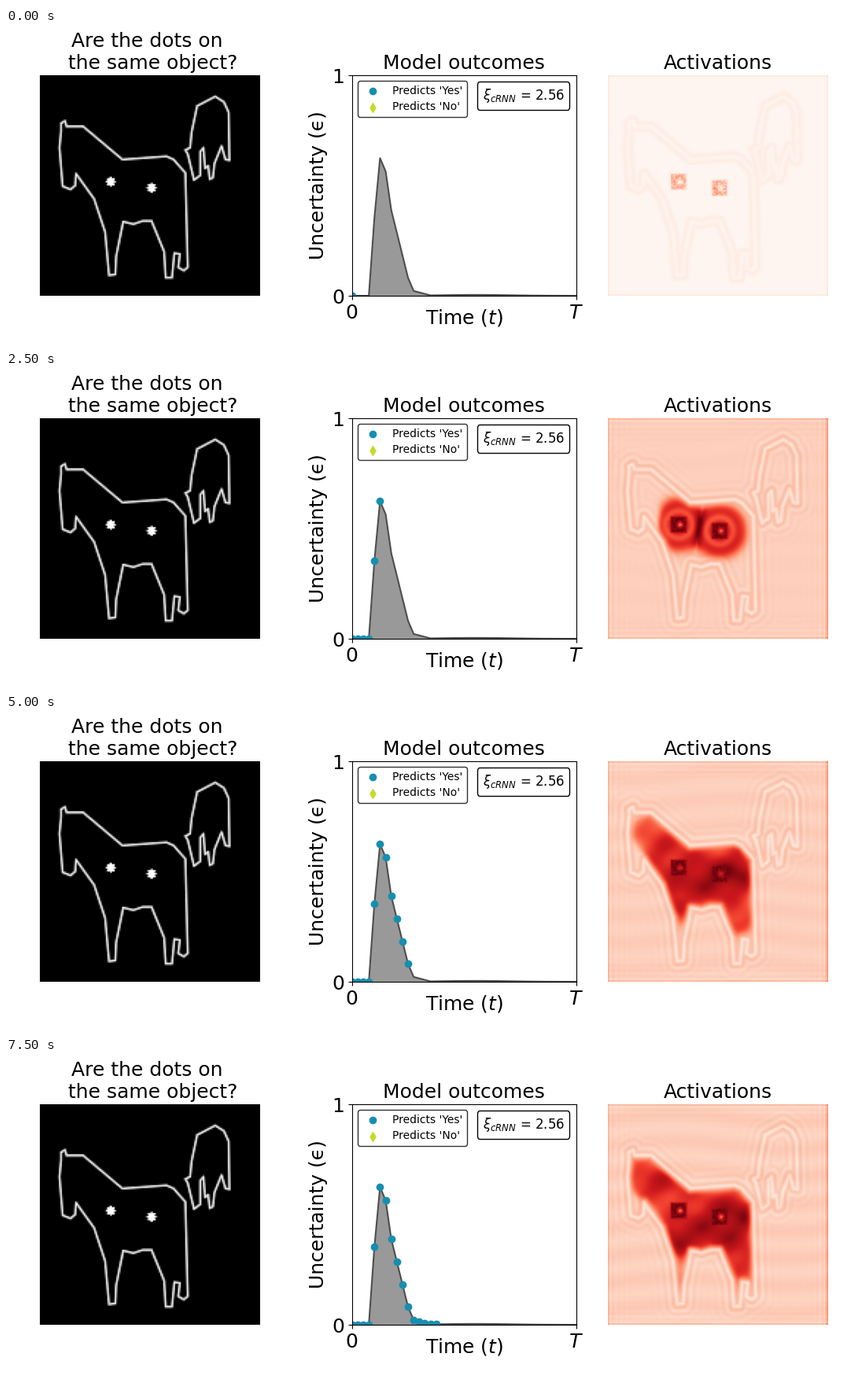
A matplotlib script for the animation above (8000 ms loop, 1088x400 px).

```python
import numpy as np
import matplotlib.pyplot as plt
from matplotlib.animation import FuncAnimation
from matplotlib.offsetbox import AnchoredText
from matplotlib.path import Path

W, H, DPI = 1088, 400, 100
FRAMES, INTERVAL, STEPS = 16, 500, 40
BLUE, LIME = "#168eb0", "#c6d92b"
plt.rcParams["font.family"] = "DejaVu Sans"

# Corner points of the two animals and the dots, in stage pixels
HORSE = np.array([
    (70, 131), (70, 121), (75, 118), (77, 125), (98, 125), (148, 167),
    (204, 163), (213, 167), (228, 184), (231, 304), (226, 308), (219, 304),
    (221, 287), (214, 286), (211, 317), (203, 317), (201, 284), (185, 245),
    (174, 245), (162, 249), (149, 246), (140, 290), (139, 313), (131, 314),
    (126, 259), (112, 217), (89, 185), (88, 200), (82, 205), (72, 201),
    (68, 152)])
COW = np.array([
    (228, 155), (234, 152), (236, 132), (243, 99), (266, 87), (277, 94),
    (283, 107), (284, 168), (279, 167), (274, 150), (265, 172), (263, 190),
    (259, 192), (257, 175), (253, 178), (251, 152), (247, 157), (247, 187),
    (239, 193), (231, 160)])
DOTS = [(133, 195), (185, 203)]

N, SIDE = 150, 280
cell = (np.arange(N) + 0.5) * SIDE / N
X, Y = np.meshgrid(43 + cell, 60 + cell)


def outline_dist(points):
    best = np.full(X.shape, 1e9)
    for (x0, y0), (x1, y1) in zip(points, np.roll(points, -1, axis=0)):
        dx, dy = x1 - x0, y1 - y0
        u = np.clip(((X - x0) * dx + (Y - y0) * dy) / (dx * dx + dy * dy), 0, 1)
        best = np.minimum(best, np.hypot(X - x0 - u * dx, Y - y0 - u * dy))
    return best


def bell(v, width):
    return np.exp(-(v / width) ** 2)


def soft(v, width):
    return 1 / (1 + np.exp(-np.clip(v / width, -50, 50)))


def ease(v):
    v = np.clip(v, 0, 1)
    return v * v * (3 - 2 * v)


horse_d = outline_dist(HORSE)
d = np.minimum(horse_d, outline_dist(COW))
inside = Path(HORSE).contains_points(np.c_[X.ravel(), Y.ravel()]).reshape(X.shape)
body = soft(np.where(inside, horse_d, -horse_d) - 5, 1.5)
dot_r = [np.hypot(X - x, Y - y) for x, y in DOTS]
muzzle = bell(np.hypot(X - 74, Y - 190), 25)
arrival = np.minimum(*dot_r) + 60 * muzzle
haunch = bell(np.hypot(X - 205, Y - 238), 35)
edges = np.minimum(X - 43, 323 - X), np.minimum(Y - 60, 340 - Y)

rng = np.random.default_rng(4)
grain = rng.uniform(-1, 1, X.shape)
waves = rng.uniform(-.16, .16, (6, 2)), rng.uniform(0, 2 * np.pi, 6)


def texture(k):
    return sum(np.sin(a * X + b * Y + p + k / 4) for (a, b), p in zip(*waves)) / 6


def background(k):
    settled = ease(k / 3)
    a = .185 * (1 - np.exp(-1.4 * k)) + (.05 + .3 * k) * np.exp(-k) * bell(d - 4.5, 3)
    a -= .08 * settled * np.cos(d * 2 * np.pi / 9) * np.exp(-d / 9)
    for e in edges:
        a += .025 * settled * np.cos(e * 2 * np.pi / 7) * np.exp(-e / 14)
        a += .07 * (e < 2)
    a += .08 * min(k, 1) * (X > 320)
    return a + .018 * ease(k / 15) * np.sin(Y / 5.5 + np.sin(X / 45 + k / 3)) * ~inside


def spread(k):
    """Level inside the horse and how far it has filled."""
    level = .74 * ease(k / 4) - .003 * np.maximum(arrival - 30, 0)
    level += ease(k / 12) * .12 * haunch
    level += ease((k - 4) / 4) * .28 * texture(k)
    meet = bell(k - 5, 2)
    level += .35 * meet * bell(dot_r[0] - dot_r[1], 9)
    for r in dot_r:
        level -= .18 * meet * bell(r - 17, 5)
    reach = 8 + 90 * ease(k / 14)
    return level, soft(reach - arrival, 2.5 + k / 5) * body


def activation(k):
    a = background(k)
    level, fill = spread(k)
    a += (np.maximum(level, a) - a) * fill

    # dark squares over the dots, each with a pulsing pale speck
    speck = .4 * (1 + np.cos(2 * np.pi * (k - 3) / 10))
    value = .97 - .7 * np.exp(-1.5 * k) + .06 * (1 + np.exp(-k)) * grain
    for x, y in DOTS:
        mask = soft(9.8 - np.maximum(abs(X - x), abs(Y - y)), .5)
        spot = value - speck * bell(np.hypot(X - x - 2, Y - y), 3.2)
        a += (spot - a) * mask
    return np.clip(a, 0, 1)


def stimulus():
    img = .92 * np.clip((2.2 - d) / 1.6, 0, 1)
    for (x, y), r in zip(DOTS, dot_r):
        rim = 5.7 + .9 * np.cos(8 * np.arctan2(Y - y, X - x))
        img = np.maximum(img, np.clip((rim - r) / 1.2 + .5, 0, 1))
    return img


def panel(x, width, title):
    ax = fig.add_axes([x / W, 60 / H, width / W, SIDE / H])
    ax.set_title(title, fontsize=18)
    return ax


fig = plt.figure(figsize=(W / DPI, H / DPI), dpi=DPI, facecolor="white")

ax = panel(43, SIDE, "Are the dots on \n the same object?")
ax.imshow(stimulus(), cmap="gray", vmin=0, vmax=1)
ax.axis("off")

# Uncertainty: a sharp peak, a straight decline and a slight late swell
t = np.arange(STEPS + 1)
knots = [(3, 0), (4, .355), (5, .624), (6, .564), (7, .388), (10, .08), (11, .021), (14, 0)]
eps = np.interp(t, *zip(*knots)) + .004 * bell(t - 22, 9)

ax = panel(439.8, 285, "Model outcomes")
ax.fill_between(t, eps, color="#999999", lw=0, zorder=0.8)
ax.plot(t, eps, color="#4d4d4d", lw=1.5, zorder=0.9)
dots = ax.scatter([], [], color=BLUE, label="Predicts 'Yes'")
ax.scatter([], [], color=LIME, marker="d", label="Predicts 'No'")
ax.set(xlim=(0, STEPS), ylim=(0, 1))
ax.set_xticks([0, STEPS], ["0", "$T$"], fontsize=18)
ax.set_yticks([0, 1], ["0", "1"], fontsize=18)
ax.set_ylabel("Uncertainty (\u03f5)", fontsize=18)
ax.text(.5, -35.5 / SIDE, "Time ($t$)", fontsize=18, ha="center",
        va="baseline", transform=ax.transAxes)
ax.legend(loc="upper left", fontsize=10, edgecolor="black")
note = AnchoredText(r"$\xi_{cRNN}$ = 2.56", loc="upper right", prop=dict(size=12))
note.patch.set_boxstyle("round,pad=0,rounding_size=0.2")
ax.add_artist(note)

ax = panel(765, SIDE, "Activations")
heat = ax.imshow(activation(0), cmap="Reds", vmin=0, vmax=1)
ax.axis("off")


def draw(k):
    dots.set_offsets(np.c_[t[:k + 1], eps[:k + 1]])
    heat.set_data(activation(k))
    return dots, heat


anim = FuncAnimation(fig, draw, frames=FRAMES, interval=INTERVAL,
                     repeat=True, repeat_delay=0, blit=False)
plt.show()
```
